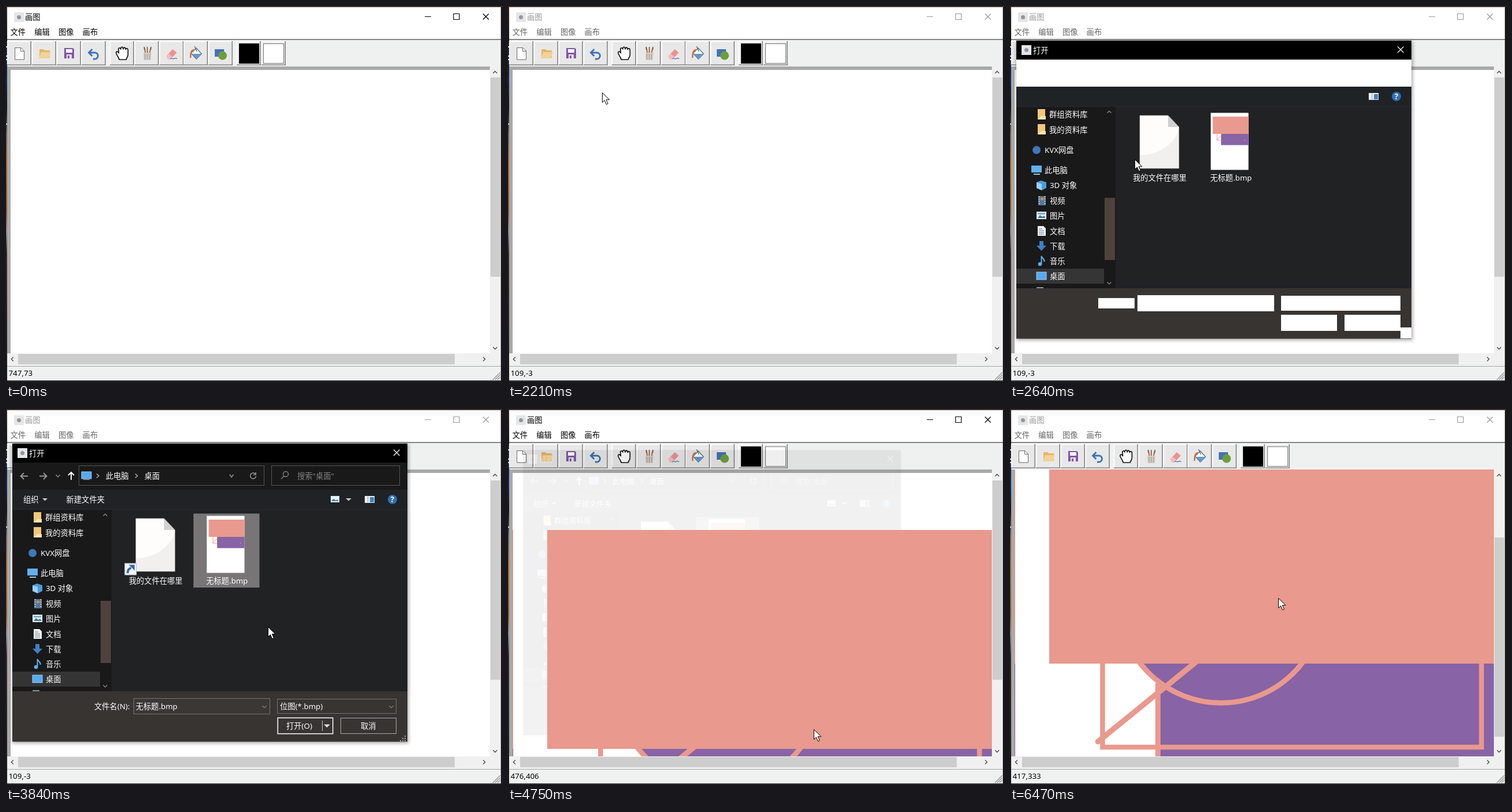
Write an HTML page that moves like this. It is 860 px wide and 651 px high and loops after 6570 ms.

```html
<!DOCTYPE html>
<html lang="zh">
<head>
<meta charset="utf-8">
<style>
html, body { margin: 0; width: 100%; height: 100%; overflow: hidden; background: #fff; }
svg { display: block; width: 860px; height: 651px; }
text { font: 13.3px "Noto Sans", "Noto Sans CJK SC", "Noto Sans CJK", sans-serif; white-space: pre; }
.title, .menu { fill: #000; }
.sys { stroke: #000; fill: none; stroke-width: 1.2; }
.idle .title { fill: #999; }
.idle .menu { fill: #666; }
.idle .sys { stroke: #999; }
</style>
</head>
<body>
<svg id="stage" viewBox="0 0 860 651"></svg>
<script>
const SALMON = '#e9998d', PURPLE = '#8863a5', FACE = '#e8e8e8', BAR = '#eff1f1';
const rect = (x, y, w, h, fill, more = '') =>
  `<rect x="${x}" y="${y}" width="${w}" height="${h}" fill="${fill}" ${more}/>`;
const text = (x, y, s, fill = '#fff', more = '') => `<text x="${x}" y="${y}" fill="${fill}" ${more}>${s}</text>`;
const fill = (d, color, more = '') => `<path d="${d}" fill="${color}" ${more}/>`;
const line = (d, color, width = 1, more = '') =>
  `<path d="${d}" fill="none" stroke="${color}" stroke-width="${width}" ${more}/>`;
const disc = (x, y, r, color) => `<circle cx="${x}" cy="${y}" r="${r}" fill="${color}"/>`;
const group = (id, body, more = '') => `<g id="${id}" ${more}>${body}</g>`;
const frame = (x, y, w, h, color, bg = 'none') =>
  rect(x + .5, y + .5, w - 1, h - 1, bg, `stroke="${color}"`);
const chevron = (x, y, dx, dy, color, width = 1.3) => line(dx
  ? `M${x - dx / 2} ${y - 3.5}l${dx} 3.5l${-dx} 3.5`
  : `M${x - 3.5} ${y - dy / 2}l3.5 ${dy}l3.5 ${-dy}`, color, width);

const bevel = (x, w = 42) => rect(x, 61, w, 42, FACE) +
  line(`M${x + .5} 102V61.5H${x + w - 1}`, '#fff', 1.5) +
  line(`M${x} 102.2H${x + w - .8}V61`, '#858585', 1.6);

const appIcon = (x, y) => rect(x, y, 17, 17, '#e6e6e6') + disc(x + 8.5, y + 8.5, 3.5, '#8b98a6');

function desktop() {
  return `<defs><linearGradient id="wall" x2="0" y2="1">
    <stop offset="0" stop-color="#3a2b26"/><stop offset=".1" stop-color="#111"/>
    <stop offset=".2" stop-color="#15306c"/><stop offset=".27" stop-color="#18181c"/>
    <stop offset=".34" stop-color="#6d625e"/><stop offset=".42" stop-color="#a8662c"/>
    <stop offset=".55" stop-color="#8c572c"/><stop offset=".6" stop-color="#8a8488"/>
    <stop offset=".66" stop-color="#40302b"/><stop offset="1" stop-color="#1b1a1c"/></linearGradient>
    <clipPath id="view"><path d="M2 105H839V603H2z"/></clipPath>
    <clipPath id="side"><path d="M11 175H163V490H11z"/></clipPath>
    <filter id="soft" x="-5%" y="-5%" width="110%" height="110%"><feGaussianBlur stdDeviation="3"/></filter></defs>` +
    rect(0, 0, 860, 651, '#211d1d') + rect(0, 0, 860, 2, '#4a322b') + rect(0, 0, 2, 651, 'url(#wall)') +
    line('M0 71h2M0 87h2M0 93h2M0 205h2', '#ddd', 2);
}

function toolIcons() {
  return fill('M15.5 72.500h10.500l5.500 5.500v15h-16z', '#fff', 'stroke="#666"') + line('M25.500 72.500v6h6', '#666') +
    fill('M58 75h7l2 2h9v13H58z', '#e5b565') + fill('M61 80h17l-4 11H57z', '#f2d298') +
    fill('M101 73h15l2 2v16h-17z', '#8058a5') + rect(104, 75, 11, 6, '#fff') + rect(105, 84, 9, 7, '#e8e0ef') + rect(107, 86, 3, 5, '#8058a5') +
    line('M149.500 75l-6 6 6 6M144 81h10a5.500 5.500 0 0 1 0 11h-3', '#3c72b4', 2.800) +
    fill('M195.500 91c-1-4-5-7-4.500-10s3-2 4.500.5L195 75c0-3 3.500-3 4 0c0-5 4-5 4.200 0c.5-4 4-4 4.300.5c.5-2.500 4-2.500 4 1v8c0 4-2.500 5-3 8.500h-12z',
      '#fff', 'stroke="#111" stroke-width="1.700" stroke-linejoin="round"') +
    line('M240 73l2 10M245 71v12M251 73l-2.500 10', '#b06a3c', 2) + line('M239.500 71l1 5M251.500 71l-1 5', '#666', 2) +
    fill('M238 81h14l-1 13h-12z', '#d3cec8') + line('M241 83v10M245 83v10M249 83v10', '#9a8f86') +
    fill('M278 87l11-12 7 6-11 12h-4z', '#ee9090') + fill('M278 87l4-4.500 7 6-4 4.500h-4z', '#f5bcbc') +
    line('M285 92c3-4 4 2 7-1c2-2 3 1 5 0', '#4472b8', 1.200) +
    fill('M321 82l9-9 9 10-9 9z', '#fff', 'stroke="#4f6c8c" stroke-width="1.300"') + fill('M323 83h15l-8 8z', '#5b9bd5') +
    line('M327 70l4 9', '#555', 1.200) + line('M326 76c-5 1-6 5-6 14', '#d0733a', 2.500) +
    rect(362, 75, 16, 13, '#4472b8') + disc(375.5, 86, 7.5, '#6b9f3b');
}

function appWindow() {
  const starts = [2, 45, 88, 131, 180, 223, 266, 308, 351, 400, 443];
  const menus = ['文件', '编辑', '图像', '画布'];
  return rect(2, 2, 856, 648, BAR) + rect(2, 2, 856, 55, '#fff') +
    group('chrome', appIcon(14, 11) + `<text class="title" x="33" y="24">画图</text>` +
      menus.map((m, i) => `<text class="menu" x="${7.5 + i * 41.7}" y="50">${m}</text>`).join('') +
      `<path class="sys" d="M726 18.500h11M776 13.500h10v10h-10zM827 13.500l10 10M837 13.500l-10 10"/>`) +
    rect(2, 57, 856, 1, '#a0a0a0') + rect(2, 58, 856, 1, '#6c6c6c') +
    starts.map(x => bevel(x)).join('') + toolIcons() +
    rect(404, 65, 35, 35, '#000') + frame(446, 65, 36, 35, '#777', '#fff') +
    group('press', line('M45.500 102V61.500H87', '#777', 1.500) + line('M45 102.500H86.500V61', '#fff', 1.500)) +
    rect(2, 105, 837, 498, '#fff') + rect(2, 105, 6, 498, '#a9a9a9') +
    group('edge', rect(2, 105, 837, 6, '#a9a9a9'), 'clip-path="url(#view)"') +
    rect(839, 105, 19, 499, '#f0f0f0') + rect(2, 603, 856, 20, '#f0f0f0') +
    group('thumb', rect(840, 124, 17, 346, '#cdcdcd')) + rect(21, 604, 757, 18, '#cdcdcd') +
    chevron(848, 115, 0, -3.5, '#444') + chevron(848, 594, 0, 3.5, '#444') +
    chevron(11, 613, -3.5, 0, '#444') + chevron(829, 613, 3.5, 0, '#444') +
    rect(2, 625, 856, 1, '#a5a5a5') + `<text id="status" x="4.500" y="641.500"></text>` +
    line('M844 649l13-13M848 649l9-9M852 649l5-5', '#999', 1.500);
}

function sidebar() {
  const folder = y => fill(`M48 ${y - 9}h13v18H48z`, '#f0c77c') + fill(`M48 ${y + 9}l6-6h8v6z`, '#fce5ad');
  const items = [[68, 188, '群组资料库'], [68, 214.5, '我的资料库'], [60, 249.5, 'KVX网盘'], [60, 284.5, '此电脑'],
    [69, 311, '3D 对象'], [69, 337.5, '视频'], [69, 364, '图片'], [69, 390.5, '文档'],
    [69, 416.5, '下载'], [69, 443, '音乐'], [69, 469, '桌面'], [69, 498, 'Drumlin SSD (']];
  return rect(11, 456, 152, 26, '#353535') + folder(188) + folder(214) + disc(46, 250, 7, '#3d78b8') +
    rect(37, 277, 18, 12, '#62b0ee') + rect(41, 291, 11, 2, '#9cc7ea') +
    fill('M46 306l8-3 9 3v10l-8 4-9-4z', '#4d9bd9') + fill('M46 306l9 3v11l-9-4z', '#9ad0f2') +
    rect(49, 330, 13, 16, '#56789a') + line('M50.500 330v16M60.500 330v16', '#ddd', 1.500, 'stroke-dasharray="2 2"') + rect(53, 333, 5, 4, '#d08a4a') +
    rect(46, 357, 17, 13, '#e8f1f6') + fill('M48 368l4-5 4 3 3-2 3 4z', '#3c7498') + rect(48, 359, 13, 3, '#6fb4dc') +
    fill('M48 382h10l4 4v13H48z', '#f2f2f2') + line('M50 387h6M50 390h9M50 393h9M50 396h9', '#5f7f9d') +
    fill('M51 408h7v8h5l-8.500 9-8.500-9h5z', '#3e7fc6') +
    line('M54.500 448v-14c1 5 6 4 5 10', '#5fb0ee', 2) + disc(52, 448, 3.3, '#5fb0ee') +
    rect(46, 462, 17, 13, '#57aaf0', 'stroke="#9fd0f7"') + rect(46, 488, 12, 3, '#8494a3') +
    items.map(([x, y, s]) => text(x, y + 5, s)).join('');
}

function files() {
  return group('hoverA', rect(203, 182, 114, 128, '#4d4d4d')) +
    group('hoverB', rect(325, 182, 114, 128, '#4d4d4d')) + group('picked', rect(325, 181.5, 114.5, 128.5, '#777576')) +
    fill('M225 190h49l19 20v72h-68z', '#f1f0ef') + fill('M225 190h49v20h19c-4 26-32 49-68 49z', '#fffdfb') +
    fill('M274 190v20h19z', '#d3d1d0') + line('M225 190h49l19 20v72h-68z', '#a9a5a2', .6) +
    rect(348, 185.5, 65.5, 99, '#fff') + rect(351.5, 192, 62, 30, SALMON) + rect(366, 222, 47.5, 19.5, PURPLE) +
    line('M359 222v11h7M358 233l9-9', SALMON) + rect(406, 232, 1.5, 1.5, SALMON) +
    text(213, 303, '我的文件在哪里') + text(347, 303, '无标题.bmp') +
    group('badge', rect(206, 268, 20, 20, '#f4f4f4', 'stroke="#bbb"') +
      line('M211 285c0-6 2-8 6-9', '#2d6cb5', 4) + fill('M213 270.500h10v10z', '#2d6cb5'));
}

function controls() {
  const arrow = (x, y, dx, dy, c) => line(dx ? `M${x - 6} ${y}h12M${x + dx} ${y - 5}l${dx} 5l${-dx} 5` : `M${x} ${y + 7}v-13M${x - 5} ${y - 1}l5-5l5 5`, c, 2);
  return arrow(32, 116, 0, 0, 'none') + line('M38 116.500H26M31 111l-5.500 5.500 5.500 5.500', '#999', 1.800) +
    line('M58 116.500h12M65 111l5.500 5.500-5.500 5.500', '#999', 1.800) + chevron(90, 116, 0, 3.5, '#888', 1.6) +
    arrow(113, 116, 0, 1, '#fff') + frame(126, 98, 322, 35, '#555') + frame(460, 98, 223, 35, '#555') +
    rect(131, 109, 17, 12, '#57aaf0', 'stroke="#9fd0f7"') + rect(134, 122, 11, 1, '#8ac') +
    chevron(159, 116, 4, 0, '#aaa', 1.6) + text(173, 121, '此电脑') + chevron(226, 116, 4, 0, '#aaa', 1.6) + text(240, 121, '桌面') +
    chevron(391, 116, 0, 4.5, '#888', 1.8) + line('M432 112.500a5 5 0 1 0 1.500 4M433 110v4h-4', '#999', 1.500) +
    `<circle cx="485" cy="113" r="4.500" fill="none" stroke="#888" stroke-width="1.300"/>` + line('M482 116.500l-5 5', '#888', 1.300) +
    text(505, 121, '搜索"桌面"', '#858585') + text(30, 162, '组织') + fill('M63 155h9l-4.500 4.500z', '#ccc') + text(104.5, 162, '新建文件夹') +
    rect(563, 151, 15, 11, '#e4f2f8') + fill('M564 160l4-4 4 3 2-2 3 3z', '#357ba8') + fill('M589 155h10l-5 4.500z', '#ccc') +
    text(153, 521, '文件名(N):') + frame(221, 502, 237, 28, '#77736f', '#3b3735') + chevron(448, 517, 0, 3.5, '#bbb', 1) +
    frame(470, 503, 207, 26, '#77736f') + text(475, 521, '位图(*.bmp)') + chevron(668, 517, 0, 3.5, '#bbb', 1) +
    group('openHot', rect(471, 536, 96, 28, '#5a5654')) +
    rect(471.2, 536.2, 95.5, 27.5, 'none', 'stroke="#fff" stroke-width="1.500"') + text(486, 555, '打开(O)') +
    line('M548.500 541v18', '#ccc') + fill('M551 547.500h11l-5.500 5.500z', '#ddd') +
    frame(580, 536, 97, 28, '#aaa') + text(615, 555, '取消') +
    line('M691 568h2M687 572h6M683 576h10', '#aaa', 2, 'stroke-dasharray="2 2"') +
    group('name', text(225, 521, '无标题.bmp'));
}

function dialog() {
  const blanks = [[11, 93, 685, 47], [153, 507, 63, 18], [221, 502, 237, 28], [470, 503, 207, 26], [470, 536, 97, 28], [580, 536, 97, 28], [677, 558, 19, 19]];
  return rect(11, 61, 687, 519, '#000', 'opacity=".35" filter="url(#soft)"') +
    rect(11, 60, 685, 517.5, '#202224') + rect(11, 60, 685, 33, '#000') + rect(11, 93, 685, 47, '#191919') +
    rect(11, 140, 685, 34, '#202326') + rect(11, 174, 685, 1, '#2a2a2a') + rect(11, 175, 172, 315, '#191919') +
    rect(11, 490, 685, 87, '#383432') + appIcon(20, 68) + text(40, 81.5, '打开') +
    line('M672 70.500l10.500 10.500M682.500 70.500l-10.500 10.500', '#fff', 1.200) +
    rect(622, 151, 17, 12, '#eee') + rect(631, 153, 7, 9, '#3c82cc') + line('M627.500 152v10', '#999') +
    disc(670, 157, 8, '#2f6fb4') + text(670, 162, '?', '#fff', 'text-anchor="middle" style="font-weight:700"') +
    group('tree', sidebar(), 'clip-path="url(#side)"') +
    rect(164, 333, 18, 108, '#4f423d') + chevron(172, 184, 0, -3.5, '#888') + chevron(172, 481, 0, 3.5, '#888') +
    group('files', files()) + group('blanks', blanks.map(b => rect(...b, '#fff')).join('')) + group('controls', controls());
}

function artwork() {
  return rect(8, 210, 1, 380, SALMON) + rect(8, 590, 1, 200, PURPLE) +
    `<circle cx="366" cy="481" r="177.300" fill="${PURPLE}"/>` + rect(256, 590, 583, 200, PURPLE) +
    line('M256.500 624V790', SALMON, 9) +
    `<circle cx="366" cy="481" r="177.300" fill="none" stroke="${SALMON}" stroke-width="9"/>` +
    line('M152.500 725.500L330 581', SALMON, 9.5, 'stroke-linecap="round"') +
    line('M160.500 580V735H817.500V580', SALMON, 8.5) + rect(68, 210, 771, 380, SALMON);
}

const $ = id => document.getElementById(id);
$('stage').innerHTML = desktop() + appWindow() + group('dialog', dialog()) +
  `<g clip-path="url(#view)">${group('art', artwork())}</g>` +
  group('cursor', fill('M0 0V17L4 13.300 7 20.300 9.800 19 6.800 12.200H12.500Z', '#fff', 'stroke="#000"'));

// Pointer stops: step, x, y
const stops = [[1, 827, 190], [5, 690, 215], [10, 330, 180], [14, 127, 107], [15, 112, 86], [16, 72, 84], [18, 80, 92],
  [22, 163, 150], [24, 196, 222], [26, 216, 266], [31, 218, 266], [35, 384, 250], [36, 384, 250],
  [38, 454, 378], [44, 530, 556], [49, 530, 556], [52, 465, 326], [60, 465, 326], [64, 465, 328]];

function pointer(n) {
  const i = stops.findIndex(s => s[0] >= n);
  if (i < 1) return stops[0].slice(1);
  const [a, x, y] = stops[i - 1], [b, u, v] = stops[i], k = (n - a) / (b - a);
  return [x + (u - x) * k, y + (v - y) * k];
}

function scrollAt(n) {
  if (n < 57) return 0;
  return n < 63 ? 27 * Math.min(n - 56, 4) : 108 + 20 * (n - 62);
}

function stepAt(t) {
  const lag = t < 700 ? 0 : t < 2320 ? 10 : t < 5100 ? 40 : 60;
  return Math.min(64, Math.floor((t - lag) / 100));
}

const show = (id, on) => { $(id).style.display = on ? '' : 'none'; };

function draw(n) {
  const [x, y] = pointer(n), s = scrollAt(n);
  const coords = (n > 14 && n < 46) ? '109,-3'
    : `${Math.round((x - 7) / 1.098)},${Math.round((y - 110 + s) / 1.098)}`;
  $('status').textContent = coords;
  $('chrome').setAttribute('class', (n >= 18 && n < 46) || n >= 52 ? 'idle' : '');
  show('cursor', n > 0);
  $('cursor').setAttribute('transform', `translate(${x + .5} ${y + .5})`);
  show('press', n === 16);

  show('dialog', n >= 25 && n < 48);
  const size = n === 46 ? .98 : n === 47 ? .956 : 1;
  $('dialog').setAttribute('transform', `translate(353 318) scale(${size}) translate(-353 -318)`);
  $('dialog').setAttribute('opacity', n === 46 ? .5 : n === 47 ? .06 : 1);
  show('files', n >= 26);
  show('blanks', n < 27);
  show('controls', n >= 27);
  show('badge', n >= 27);
  show('hoverA', n >= 27 && n < 33);
  show('hoverB', n === 34 || n === 35);
  show('picked', n >= 36);
  show('name', n >= 36);
  show('openHot', n >= 43 && n < 46);

  show('art', n >= 47);
  $('art').setAttribute('transform', `translate(0 ${-s})`);
  $('edge').firstChild.setAttribute('y', 105 - s);
  $('thumb').setAttribute('transform', `translate(0 ${s ? 15 + (s - 27) * .694 : 0})`);
}

let last = -1;
const began = performance.now();
function tick() {
  const n = stepAt((performance.now() - began) % 6570);
  if (n !== last) draw(last = n);
  requestAnimationFrame(tick);
}
tick();
</script>
</body>
</html>
```
